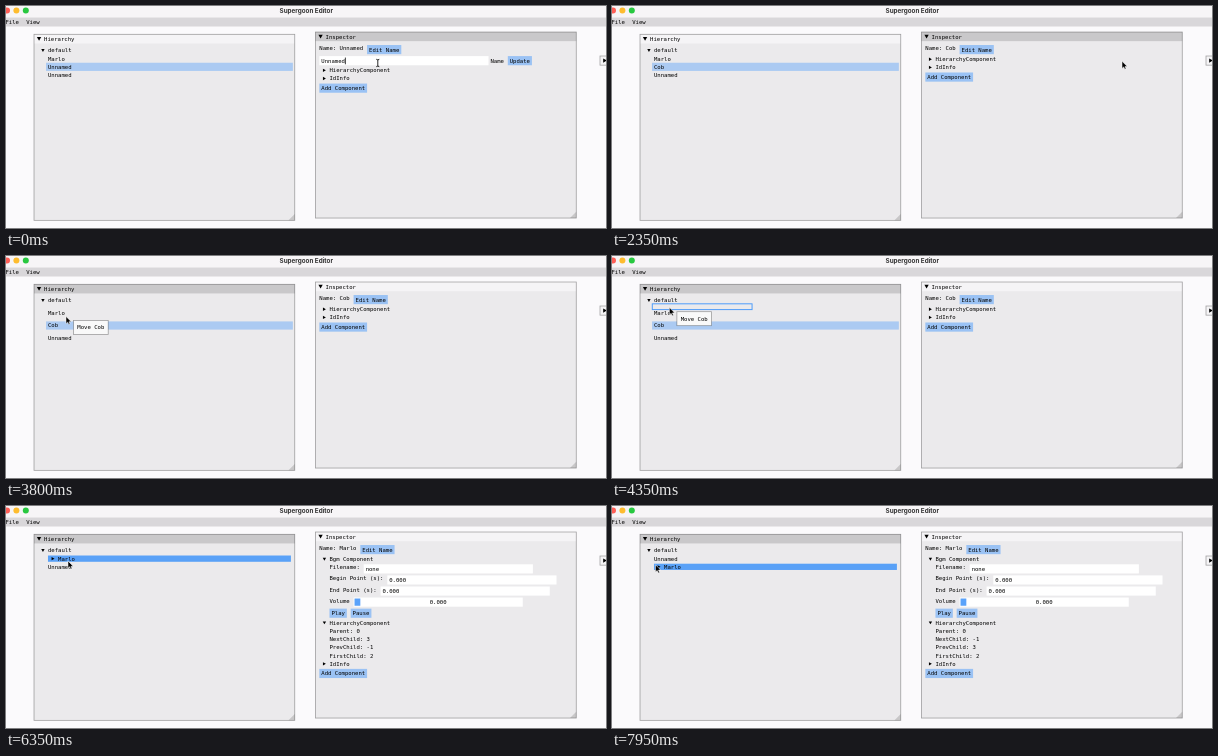
Write an HTML page with a canvas that moves like this. It is 600 px wide and 222 px high and loops after 8000 ms.

```html
<!DOCTYPE html>
<html lang="en">
<head>
<meta charset="utf-8">
<title>Editor</title>
<style>
html, body { margin: 0; width: 100%; height: 100%; overflow: hidden; background: #fbfafc; }
canvas { display: block; width: 600px; height: 222px; }
</style>
</head>
<body>
<canvas id="stage"></canvas>
<script>
const W = 600, H = 222, LOOP = 8000;
const S = 0.482;            // pixels per interface unit
const CH = 7, TEXT = 13, LINE = 17, FRAME = 19;
const FIRST = "Marlo", SECOND = "Cob", BLANK = "Unnamed";
const BORDER = "rgba(0,0,0,.36)";
const BLUE = a => `rgba(66,150,250,${a})`;

const canvas = document.getElementById("stage");
const ctx = canvas.getContext("2d");
const dpr = window.devicePixelRatio || 1;
canvas.width = W * dpr;
canvas.height = H * dpr;

// Moments at which the interface changes
const T = {
  erase: 400, type: 1300, update: 2200,
  pickSecond: 3650, dragSecond: 3750, overTop: 4100, overFirst: 4850, dropSecond: 5250,
  pickFirst: 6300, dragFirst: 6400, overEnd: 7150, dropFirst: 7500
};

// Pointer path: time, x, y
const PATH = [
  [0, 371.8, 56.5], [1650, 371.8, 56.5], [2100, 514, 55], [2300, 514, 55],
  [3000, 251.5, 70], [3100, 250, 70], [3150, 250, 70], [3600, 60, 61.5],
  [3750, 60, 61], [3950, 60, 57.5], [4300, 57.4, 51.6], [4800, 57, 51.5],
  [5200, 66.8, 60.3], [5550, 66.8, 60.3], [5950, 62, 55], [6300, 62, 55],
  [6400, 62, 55], [6900, 59.5, 76.8], [7100, 59.5, 76.5], [7300, 59.5, 75],
  [7500, 59.5, 75], [7900, 43.5, 58.8], [8000, 43.5, 58.8]
];

const between = (t, a, b) => t >= a && t < b;
let mouse = { x: 0, y: 0 };
let origin = { x: 0, y: 0 };

function pointerAt(t) {
  let i = 1;
  while (i < PATH.length - 1 && PATH[i][0] <= t) i++;
  const [t0, x0, y0] = PATH[i - 1], [t1, x1, y1] = PATH[i];
  const p = Math.min(1, (t - t0) / (t1 - t0));
  const e = p * p * (3 - 2 * p);
  return { x: x0 + (x1 - x0) * e, y: y0 + (y1 - y0) * e };
}

function pixels() {
  ctx.setTransform(dpr, 0, 0, dpr, 0, 0);
}

function units(x, y) {
  origin = { x, y };
  ctx.setTransform(S * dpr, 0, 0, S * dpr, x * dpr, y * dpr);
}

function hovered(x, y, w, h) {
  const mx = (mouse.x - origin.x) / S, my = (mouse.y - origin.y) / S;
  return mx >= x && mx < x + w && my >= y && my < y + h;
}

function box(x, y, w, h, color) {
  ctx.fillStyle = color;
  ctx.fillRect(x, y, w, h);
}

function outline(x, y, w, h, color, weight) {
  ctx.strokeStyle = color;
  ctx.lineWidth = weight;
  ctx.strokeRect(x, y, w, h);
}

function shape(points, color) {
  ctx.beginPath();
  points.forEach(([x, y]) => ctx.lineTo(x, y));
  ctx.closePath();
  ctx.fillStyle = color;
  ctx.fill();
}

function label(str, x, y) {
  ctx.font = '11.63px "DejaVu Sans Mono", monospace';
  ctx.textAlign = "left";
  ctx.textBaseline = "alphabetic";
  ctx.fillStyle = "#000";
  ctx.fillText(str, x, y + 10.5);
}

function arrow(x, y, open, scale) {
  const r = 5.2 * scale, a = 0.75 * r, b = 0.866 * r;
  const cx = x + 10.5, cy = y + 6.5;
  shape(open
    ? [[cx, cy + a], [cx - b, cy - a], [cx + b, cy - a]]
    : [[cx + a, cy], [cx - a, cy + b], [cx - a, cy - b]], "#000");
}

function treeNode(str, x, y, open) {
  arrow(x, y, open, 0.78);
  label(str, x + 21, y);
}

function button(str, x, y) {
  const w = str.length * CH + 8;
  box(x, y, w, FRAME, BLUE(hovered(x, y, w, FRAME) ? 0.95 : 0.48));
  label(str, x + 4, y + 3);
  return x + w + 8;
}

function panel(title, x, y, w, h, active) {
  units(x, y);
  box(0, 0, w, h, "#ebeaec");
  box(0, 0, w, FRAME, active ? "#c9c8ca" : "#f5f4f6");
  shape([[w, h], [w - 13, h], [w, h - 13]], "rgba(89,89,89,.24)");
  outline(0, 0, w, h, BORDER, 1.6);
  arrow(0, 3, true, 1);
  label(title, 21, 3);
}

function field(caption, value, x, y) {
  label(caption, x, y);
  const left = x + caption.length * CH + 8;
  box(left, y, 351, FRAME, "#fff");
  label(value, left + 4, y + 3);
}

function typedName(t) {
  if (t < T.type) {
    const gone = t < T.erase ? 0 : Math.floor((t - T.erase) / 70) + 1;
    return BLANK.slice(0, Math.max(0, BLANK.length - gone));
  }
  return SECOND.slice(0, 1 + Math.floor((t - T.type) / 150));
}

function hierarchyRows(t) {
  const first = { name: FIRST, parent: t >= T.dropSecond, selected: t >= T.pickFirst };
  const last = { name: BLANK };
  if (t >= T.dropFirst) return [last, first];
  if (t >= T.dropSecond) return [first, last];
  return [first, { name: t < T.update ? BLANK : SECOND, selected: true }, last];
}

function dropFrame(x, y, w, h) {
  outline(x - 3.5, y - 3.5, w + 7, h + 7, BLUE(0.95), 2);
}

function hierarchy(t) {
  const w = 541;
  const dragging = between(t, T.dragSecond, T.dropSecond) || between(t, T.dragFirst, T.dropFirst);
  panel("Hierarchy", 28, 28.3, w, 386, t >= T.pickSecond);
  treeNode("default", 8, 27, true);
  const top = 27 + LINE;
  let y = top;
  hierarchyRows(t).forEach((row, i) => {
    if (dragging) y += 9;
    // Leaves fill the gaps between lines, parents only the text height
    const area = row.parent ? [29, y, w - 37, TEXT] : [25, y - 2, w - 29, LINE];
    const over = !dragging && hovered(...area);
    if (over || row.selected) box(...area, BLUE(over ? 0.86 : 0.38));
    if (row.parent) treeNode(row.name, 29, y, false);
    else label(row.name, 29, y);
    if (i === 0 && between(t, T.overFirst, T.dropSecond)) dropFrame(...area);
    y += LINE;
  });
  if (between(t, T.overTop, T.overFirst)) dropFrame(29, top, 200, 5);
  if (between(t, T.overEnd, T.dropFirst)) dropFrame(29, y, 200, 5);
}

function bgmComponent(y) {
  const x = 29;
  treeNode("Bgm Component", 8, y, true);
  y += LINE;
  [["Filename:", "none"], ["Begin Point (s):", "0.000"], ["End Point (s):", "0.000"]]
    .forEach(([caption, value]) => {
      field(caption, value, x, y);
      y += 23;
    });
  field("Volume", "", x, y);
  const left = x + 6 * CH + 8;
  box(left + 2, y + 2, 12, 15, BLUE(0.88));
  label("0.000", left + (351 - 5 * CH) / 2, y + 3);
  y += 23;
  button("Pause", button("Play", x, y), y);
  return y + 23;
}

function inspector(t) {
  const onFirst = t >= T.pickFirst, editing = t < T.update;
  const name = onFirst ? FIRST : editing ? BLANK : SECOND;
  const heading = "Name: " + name;
  panel("Inspector", 309.5, 26, 541, 386, t < T.pickSecond);
  let y = 27;
  label(heading, 8, y);
  button("Edit Name", 8 + heading.length * CH + 8, y);
  y += 23;
  if (editing) {
    const typed = typedName(t);
    box(8, y, 351, FRAME, "#fff");
    label(typed, 12, y + 3);
    box(12 + typed.length * CH, y + 3, 1.6, 14, "#000");
    label("Name", 363, y + 3);
    button("Update", 399, y);
    y += 23;
  }
  if (onFirst) y = bgmComponent(y);
  treeNode("HierarchyComponent", 8, y, onFirst);
  y += LINE;
  if (onFirst) {
    const moved = t >= T.dropFirst;
    ["Parent: 0", "NextChild: " + (moved ? -1 : 3), "PrevChild: " + (moved ? 3 : -1), "FirstChild: 2"]
      .forEach(line => {
        label(line, 29, y);
        y += LINE;
      });
  }
  treeNode("IdInfo", 8, y, false);
  button("Add Component", 8, y + LINE);
}

function tooltip(str) {
  units(mouse.x + 7.5, mouse.y + 4.1);
  const w = str.length * CH + 16;
  box(0, 0, w, 29, "#f9f9f9");
  outline(0, 0, w, 29, BORDER, 1.6);
  label(str, 8, 8);
}

function chrome() {
  pixels();
  box(0, 0, W, H, "#fbfafc");
  box(0, 0, W, 11.5, "#f7f5f7");
  ["#ff5f57", "#febc2e", "#28c840"].forEach((color, i) => {
    ctx.beginPath();
    ctx.arc(1 + i * 9.4, 4.5, 3, 0, Math.PI * 2);
    ctx.fillStyle = color;
    ctx.fill();
  });
  ctx.font = "700 6.3px Inter, sans-serif";
  ctx.textAlign = "center";
  ctx.textBaseline = "alphabetic";
  ctx.fillStyle = "#333";
  ctx.fillText("Supergoon Editor", 300.3, 7);
  box(0, 11.5, W, 9, "#d9d7da");
  units(-0.5, 13);
  label("File", 0, 0);
  label("View", 43, 0);
  units(594, 50);
  box(0, 0, 30, FRAME, "#f5f4f6");
  outline(0, 0, 30, FRAME, BORDER, 1.6);
  arrow(0, 3, false, 1);
}

function pointer(t) {
  pixels();
  const { x, y } = mouse;
  const overInput = t < T.update && x > 313 && x < 482.5;
  ctx.translate(x, y);
  if (overInput) {
    ctx.beginPath();
    ctx.moveTo(-1.5, -3.2);
    ctx.quadraticCurveTo(0, -3.2, 0, -2);
    ctx.lineTo(0, 3);
    ctx.quadraticCurveTo(0, 4.2, -1.5, 4.2);
    ctx.moveTo(1.5, -3.2);
    ctx.quadraticCurveTo(0, -3.2, 0, -2);
    ctx.moveTo(0, 3);
    ctx.quadraticCurveTo(0, 4.2, 1.5, 4.2);
    ctx.strokeStyle = "#111";
    ctx.lineWidth = 0.9;
    ctx.stroke();
    return;
  }
  shape([[0, 0], [0, 7.2], [1.7, 5.7], [2.8, 8.1], [4, 7.6], [3, 5.3], [5.2, 5.2]], "#000");
  ctx.strokeStyle = "#fff";
  ctx.lineWidth = 0.5;
  ctx.stroke();
}

function draw(now) {
  const t = now % LOOP;
  mouse = pointerAt(t);
  chrome();
  hierarchy(t);
  inspector(t);
  if (between(t, T.dragSecond, T.dropSecond)) tooltip("Move " + SECOND);
  if (between(t, T.dragFirst, T.dropFirst)) tooltip("Move " + FIRST);
  pointer(t);
}

const start = performance.now();
function tick() {
  draw(performance.now() - start);
  requestAnimationFrame(tick);
}
tick();
</script>
</body>
</html>
```
